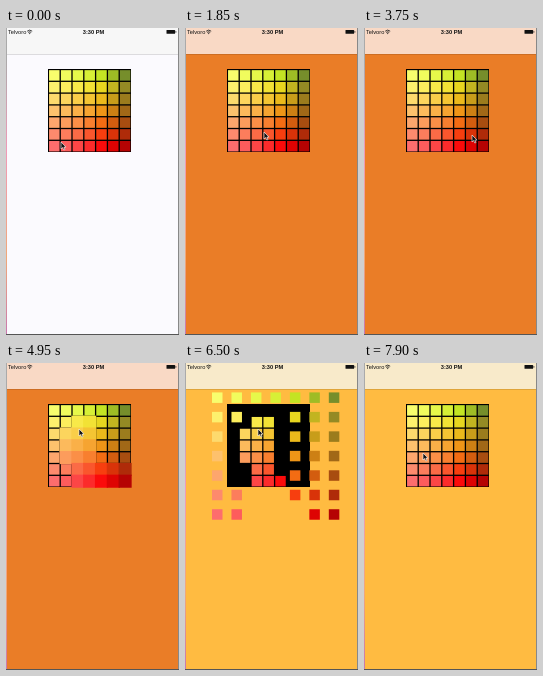
These frames come from a looping animation (173x307 px, 8 s). An HTML page:

```html
<!DOCTYPE html>
<html lang="en">
<head>
<meta charset="utf-8">
<title>Colour grid</title>
<style>
  html, body { margin: 0; width: 100%; height: 100%; overflow: hidden; }
  svg { display: block; width: 100vw; height: 100vh; }
  text { font: 5.7px "Liberation Sans", Arial, sans-serif; fill: #111; }
  .time { font-weight: bold; text-anchor: middle; }
  #page { animation: page 8s infinite; }
  #bar { animation: bar 8s infinite; }
  @keyframes page {
    0%, 9.3% { fill: #fbfafe; }
    11.8%, 70% { fill: #ea7d27; }
    75%, 100% { fill: #ffbb41; }
  }
  @keyframes bar {
    0%, 9.3% { fill: #f7f7f7; }
    11.8%, 70% { fill: #f9d9c5; }
    75%, 100% { fill: #f8eaca; }
  }
</style>
</head>
<body>
<svg viewBox="0 0 173 307">
  <defs>
    <linearGradient id="edge" x1="0" y1="0" x2="0" y2="1">
      <stop offset=".1" stop-color="#aaa"/>
      <stop offset=".4" stop-color="#f09ab8"/>
      <stop offset=".75" stop-color="#f0a878"/>
      <stop offset="1" stop-color="#c878b0"/>
    </linearGradient>
  </defs>
  <rect id="page" width="173" height="307"/>
  <rect id="bar" width="173" height="26"/>
  <rect y="26" width="173" height=".5" opacity=".25"/>
  <rect width="1" height="307" fill="url(#edge)"/>
  <rect x="172" width="1" height="307" fill="#888"/>
  <rect y="306" width="173" height="1" fill="#555"/>

  <text x="2" y="6">Telvoro</text>
  <g fill="none" stroke="#111" stroke-width=".8">
    <path d="M21.2 3.2q2.5-2.2 5 0M22.2 4.4q1.5-1.2 3 0"/>
    <circle cx="23.7" cy="5.4" r=".3"/>
  </g>
  <text class="time" x="87.5" y="6">3:30 PM</text>
  <rect x="160.5" y="2" width="8.6" height="3.8" rx=".6" fill="#111"/>
  <rect x="169.5" y="3.2" width=".8" height="1.4" fill="#111"/>

  <rect x="42" y="41" width="83" height="83"/>
  <g id="cells"></g>
  <path id="cursor" d="M0 0V7L1.7 5.5L2.8 8L4 7.5L2.9 5.1H5Z" fill="#111" stroke="#fff" stroke-width=".6"/>
</svg>
<script>
const LOOP = 8000, PITCH = 11.8, SIZE = 10.5, MOVE = 300;
const el = id => document.getElementById(id);

function ramp(t, start, span = MOVE) {
  const k = Math.max(0, Math.min(1, (t - start) / span));
  return k * k * (3 - 2 * k);
}
const pulse = (t, start, end) => ramp(t, start) - ramp(t, end);

const home = { x: 55, y: 114 };
const stops = [
  { at: 480, x: 93, y: 91 },
  { at: 700, x: 79, y: 104 },
  { at: 2200, x: 90, y: 103 },
  { at: 3400, x: 108, y: 107 },
  { at: 4600, x: 73, y: 66 },
  { at: 7600, x: 59, y: 90 }
];

// Cells along the curved stroke of the finger.
const onStroke = ({ row, col }) =>
  row > 0 && Math.abs(col - 2 - (row - 3) ** 2 / 9) < 1.3;
const onSweep = c => onStroke(c) || (c.row > 4 && c.col > 1);

// Each burst scales the grid about a point by 1 + gain; held cells stay put.
const bursts = [
  { start: 700, end: 1180, x: 94.4, y: 92.9, gain: -1.06, swell: 4.5, held: () => false },
  { start: 2560, end: 3050, x: 91, y: 105, gain: .3, swell: 0, held: c => c.row > 4 && c.col < 2 },
  { start: 5700, end: 6700, x: 73, y: 67, gain: .65, swell: 0, held: onStroke }
];

function color(row, col) {
  const hue = 62 - 62 * (row / 6) ** 1.2 + (row ? 0 : col * 2);
  const sat = 97 - (6 - row) * col * col * .2;
  const light = 71 - 3 * col - .47 * col * col;
  return `hsl(${hue} ${sat}% ${light}%)`;
}

const cells = Array.from({ length: 49 }, (_, i) => {
  const row = Math.floor(i / 7), col = i % 7;
  const node = document.createElementNS("http://www.w3.org/2000/svg", "rect");
  node.setAttribute("fill", color(row, col));
  el("cells").append(node);
  return { row, col, node, x: 48.3 + col * PITCH, y: 47.4 + row * PITCH };
});

function place(cell, t) {
  let { x, y } = cell, size = SIZE;
  for (const b of bursts) {
    if (b.held(cell)) continue;
    const p = pulse(t, b.start, b.end);
    x += (cell.x - b.x) * b.gain * p;
    y += (cell.y - b.y) * b.gain * p;
    size += b.swell * p;
  }
  // The sweep runs upwards, row by row.
  if (onSweep(cell)) size += 2.6 * pulse(t, 4600 - cell.row * 50, 5080);
  const box = { x: x - size / 2, y: y - size / 2, width: size, height: size };
  for (const name in box) cell.node.setAttribute(name, box[name]);
}

function draw(t) {
  let { x, y } = home;
  for (const s of stops) {
    const k = ramp(t, s.at);
    x += (s.x - x) * k;
    y += (s.y - y) * k;
  }
  el("cursor").setAttribute("transform", `translate(${x} ${y})`);
  for (const cell of cells) place(cell, t);
}

const begin = performance.now();
function tick() {
  draw((performance.now() - begin) % LOOP);
  requestAnimationFrame(tick);
}
tick();
</script>
</body>
</html>
```
